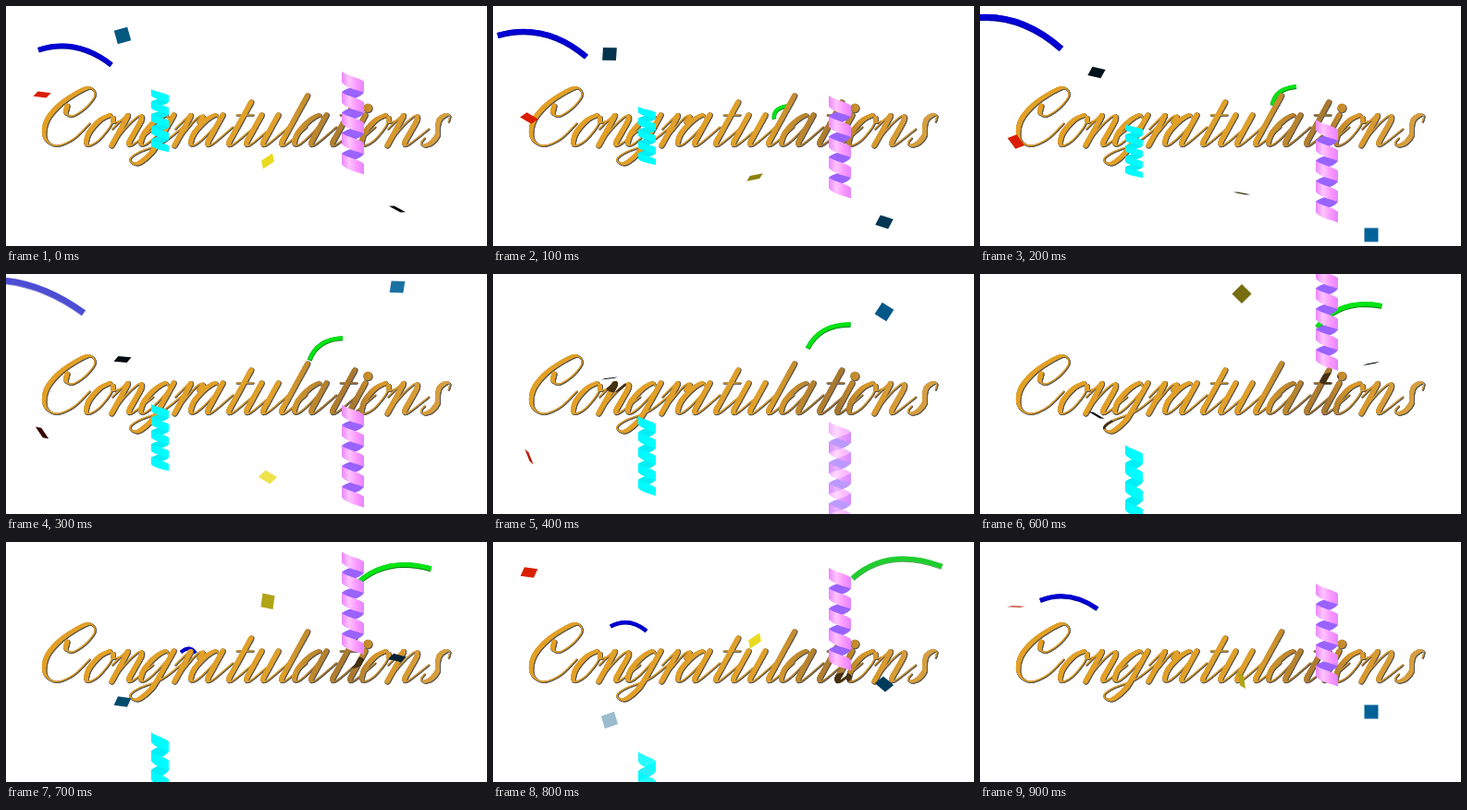
Write an HTML page with a canvas that moves like this. It is 520 by 260 pixels and loops after 1 s.

```html
<!DOCTYPE html>
<html lang="en">
<head>
<meta charset="utf-8">
<title>Congratulations</title>
<style>
html, body { margin: 0; width: 100%; height: 100%; overflow: hidden; background: #fff; }
canvas { display: block; }
</style>
</head>
<body>
<canvas id="stage" width="520" height="260" role="img" aria-label="Congratulations"></canvas>
<script>
const W = 520, H = 260, STEP = 100, STEPS = 10, RAD = Math.PI / 180;
const ctx = document.getElementById('stage').getContext('2d');

// ---------- lettering: pen strokes in upright units, slanted when drawn ----------
const SLANT = 0.55, BASE = 151;
const capC = [3.3,43, 6.7,35, 15.4,32, 24.5,41, 27.3,54, 19,62, 10,60, -4.3,46, -10,29, -5,13, 5.4,3, 18,0, 30.6,8, 38,24];
const oval = [12,33, 4,27, 0,14, 3,3, 8,0, 15,6, 19,20, 17,30, 12,33];
const link = [17,30, 21,25, 29,28];
const bowl = [19,27, 13,33, 5,27, 0,14, 2,3, 7,0.5, 13,8, 20,26];
const tail = [21,33, 20.5,0, 18,-11, 12,-19, 5,-19, 0,-14, 6,-7, 24,2, 34,14, 40,24];
const stem = [-6,18, 0,31, 2,33, 3,28, 3,0];
const arch = [3,2, 8,20, 13,30, 17,32.5, 20,27, 20,12, 20,4, 23,0, 28,4, 38,18];
const arm = [3,3, 7,18, 10,28, 14,32.5, 17,30, 15.5,26];
const ess = [24,26, 22,32, 17,33, 13,28, 16,19, 20,11, 18,3, 12,0, 7,3, 8,8];
const bar = [-5,33, 13,33];
const hook = (x, h) => [x,h, x,12, x,4, x+3,0, x+8,4, x+18,20];

// Each letter: its advance, then its strokes.
const glyphs = {
  C: [43, capC],
  o: [29, oval, link],
  n: [31, stem, arch],
  g: [37, bowl, tail],
  r: [17, stem, arm],
  a: [40, bowl, hook(20, 33)],
  t: [20, hook(3, 47), bar],
  u: [38, hook(2, 33), hook(20, 33)],
  l: [14, hook(2, 54)],
  i: [12, hook(2, 33)],
  s: [30, ess]
};

function spline(p0, p1, p2, p3, t) {
  return 0.5 * (2 * p1 + (p2 - p0) * t + (2 * p0 - 5 * p1 + 4 * p2 - p3) * t * t +
    (3 * p1 - p0 - 3 * p2 + p3) * t * t * t);
}

function trace(pts, ox) {
  const n = pts.length / 2, out = [];
  const point = (i, c) => pts[2 * Math.max(0, Math.min(n - 1, i)) + c];
  for (let i = 0; i < n - 1; i++) {
    for (let s = 0; s <= 12; s++) {
      const [u, v] = [0, 1].map(c =>
        spline(point(i - 1, c), point(i, c), point(i + 1, c), point(i + 2, c), s / 12));
      out.push([ox + u + SLANT * v, BASE - v]);
    }
  }
  return out;
}

// Downstrokes along the slant are thick, all others are hairlines.
function penStroke(g, pts, extra) {
  const len = Math.hypot(SLANT, 1);
  for (let i = 1; i < pts.length; i++) {
    const [x0, y0] = pts[i - 1], [x1, y1] = pts[i];
    const dx = x1 - x0, dy = y1 - y0, d = Math.hypot(dx, dy);
    if (d < 0.01) continue;
    const down = Math.max(0, (dy - SLANT * dx) / (d * len));
    g.lineWidth = 1.8 + 4 * down ** 1.6 + extra;
    g.beginPath();
    g.moveTo(x0, y0);
    g.lineTo(x1, y1);
    g.stroke();
  }
}

function layer() {
  const c = document.createElement('canvas');
  c.width = W;
  c.height = H;
  return c.getContext('2d');
}

function drawWord(g, paint, extra) {
  let x = 39;
  g.strokeStyle = g.fillStyle = paint;
  g.lineCap = 'round';
  for (const ch of 'Congratulations') {
    const [advance, ...strokes] = glyphs[ch];
    for (const pts of strokes) penStroke(g, trace(pts, x), extra);
    x += advance;
  }
  g.beginPath();
  g.arc(391, 110.5, 5 + extra / 2, 0, 7);
  g.fill();
}

const lettering = layer(), lit = layer();
const gold = lettering.createLinearGradient(39, 0, 481, 0);
[[0, '#e4a024'], [0.58, '#e0a02a'], [0.68, '#b8832e'], [0.76, '#a87730'], [0.82, '#d99828'], [1, '#d6a046']]
  .forEach(([pos, c]) => gold.addColorStop(pos, c));
lettering.translate(0.6, 0.6);
drawWord(lettering, '#5c5850', 0.5);
lettering.translate(-0.6, -0.6);
drawWord(lettering, gold, -0.6);

// ---------- helpers for motion ----------
// Straight moves between key poses; the first number of each pose is its step.
function pose(keys, k) {
  let i = 1;
  while (i < keys.length - 1 && k > keys[i][0]) i++;
  const a = keys[i - 1], b = keys[i], f = (k - a[0]) / (b[0] - a[0]);
  return a.map((n, j) => n + (b[j] - n) * f);
}

const wrap = (k, first) => first + ((k - first) % STEPS + STEPS) % STEPS;

// ---------- confetti: squares spinning in space ----------
// Poses: step, height, tilt, axis, light (0 black, 1 full colour, 2 white).
const confetti = [
  { x: 126, rgb: [4, 88, 128], keys: [
    [0, 32, 0, -36, 1], [2, 72, 49, 0, 0.2], [4, 113, 86, -7, 0.1], [6, 153, 82, 28, 0.1], [8, 193, 20, -38, 1.6]] },
  { x: 39, rgb: [218, 30, 0], keys: [
    [-2, 33, 50, -5, 1], [-1, 70, 86, 0, 0.85], [0, 96, 68, 0, 1], [2, 147, 49, 40, 1],
    [3, 172, 73, 50, 0.25], [4, 198, 81, 65, 0.85]] },
  { x: 423, rgb: [0, 98, 152], keys: [
    [3, 14, 35, -15, 1.1], [4, 41, 0, 13, 0.9], [6, 97, 86, -12, 0.1], [8, 154, 41, 25, 0.6],
    [9, 184, 0, 70, 1], [10, 220, 80, 25, 0.1], [12, 248, 0, -20, 1]] },
  { x: 283, rgb: [234, 218, 30], keys: [
    [6, 21.5, 0, 25, 0.5], [8, 107, 57, 135, 1], [9, 150, 70, 75, 0.75], [10, 168, 57, 135, 1],
    [12, 203, 86, 190, 0.2], [13, 220, 48, 197, 1.2]] }
];

function drawConfetti({ x, rgb, keys }, k) {
  const t = wrap(k, keys[0][0]);
  if (t > keys[keys.length - 1][0]) return;
  const [, y, tilt, axis, light] = pose(keys, t);
  const tone = rgb.map(c => light < 1 ? c * light : c + (255 - c) * (light - 1));
  ctx.save();
  ctx.translate(x, y);
  ctx.rotate(axis * RAD);
  ctx.scale(1, Math.max(0.06, Math.cos(tilt * RAD)));
  ctx.rotate(-25 * RAD);
  ctx.beginPath();
  for (let i = 0; i < 4; i++) ctx.lineTo(10.6 * Math.cos(i * Math.PI / 2), 10.6 * Math.sin(i * Math.PI / 2));
  ctx.fillStyle = `rgb(${tone.map(Math.round)})`;
  ctx.fill();
  ctx.restore();
}

// ---------- arcs ----------
function arc([x0, y0, cx, cy, x1, y1], width, color, edge, alpha) {
  ctx.globalAlpha = alpha;
  for (const [d, c, w] of [[0.6, edge, width], [0, color, width - 0.8]]) {
    ctx.strokeStyle = c;
    ctx.lineWidth = w;
    ctx.beginPath();
    ctx.moveTo(x0, y0 + d);
    ctx.quadraticCurveTo(cx, cy + d, x1, y1 + d);
    ctx.stroke();
  }
  ctx.globalAlpha = 1;
}

const blueArc = [
  [8, 127, 91, 147.5, 80.5, 166, 96],
  [9, 65, 63, 96, 50.5, 127, 72],
  [12, -25, 16, 36, 0, 88, 46],
  [13, -40, 8, 24, -2, 84, 42]
];

function drawArcs(k) {
  const b = wrap(k, 7);
  if (b <= 13) arc(pose(blueArc, b).slice(1), 4.4 + (b - 8) * 0.6, '#0000d2', '#0000a0', b === 13 ? 0.45 : 1);

  if (k < 1 || k > 8) return;
  const n = k - 2;
  const x0 = 316 + 12.1 * n, y0 = 107 - 14.5 * n + 0.53 * n * n;
  const x1 = 342 + 21.5 * n + 0.4 * n * n, y1 = 87 - 19.3 * n + 1.53 * n * n;
  arc([x0, y0, (x0 + x1) / 2 - 10, y1 + 2 - 0.65 * n * n, x1, y1],
    4.8 + n * 0.2, '#00e414', '#007a0c', k === 8 ? 0.65 : 1);
}

// ---------- curled streamers: nine half turns, back ones first ----------
function ribbon(cx, r, top, half, front, back, alpha) {
  const h = half * 1.05;
  const turn = (i, dir) => {
    const x0 = cx - dir * r, x1 = cx + dir * r, y = top + i * half;
    ctx.beginPath();
    ctx.moveTo(x0, y);
    ctx.bezierCurveTo(x0 + dir * r * 0.4, y + half * 0.4, x1 - dir * r * 0.4, y + half * 0.6, x1, y + half);
    ctx.lineTo(x1, y + half + h);
    ctx.bezierCurveTo(x1 - dir * r * 0.4, y + half * 0.8 + h, x0 + dir * r * 0.4, y + half * 0.6 + h, x0, y + h);
    ctx.fill();
  };
  ctx.globalAlpha = alpha;
  ctx.fillStyle = back;
  for (let i = 1; i < 9; i += 2) turn(i, -1);
  const shade = ctx.createLinearGradient(cx - r, 0, cx + r, 0);
  front.forEach((c, i) => shade.addColorStop(i / (front.length - 1), c));
  ctx.fillStyle = shade;
  for (let i = 0; i < 9; i += 2) turn(i, 1);
  ctx.globalAlpha = 1;
}

// Poses: step, top, height of a half turn.
const pink = [[5, -24, 11.1], [9, 45, 11.1], [12, 123, 11.1], [14, 160, 11.1]];
const cyan = [[0, 90, 6.8], [2, 128, 5.8], [4, 154, 8.6], [6, 185, 10], [8, 227, 10.5]];

// Dark reflections show only on the lettering.
function drawLettering(spots) {
  lit.globalCompositeOperation = 'copy';
  lit.drawImage(lettering.canvas, 0, 0);
  lit.globalCompositeOperation = 'source-atop';
  lit.fillStyle = '#453010';
  for (const [x, y] of spots) {
    lit.beginPath();
    lit.ellipse(x, y, 11, 6, -0.2, 0, 7);
    lit.fill();
  }
  ctx.drawImage(lit.canvas, 0, 0);
}

function draw(k) {
  const [, pinkTop, pinkHalf] = pose(pink, wrap(k, 5));
  ctx.fillStyle = '#fff';
  ctx.fillRect(0, 0, W, H);
  drawArcs(k);
  drawLettering([[377, pinkTop + 120], [133, 41 + 20.2 * k]]);
  for (const piece of confetti) drawConfetti(piece, k);
  if (k < 9) {
    const [, top, half] = pose(cyan, k);
    ribbon(166.5, 9.5, top, half, ['#00f8fc', '#00ffff'], '#00eef4', k === 8 ? 0.85 : 1);
  }
  ribbon(375, 12, pinkTop, pinkHalf, ['#ea86ff', '#ffc4ff', '#fb98ff', '#e584ff'], '#9a62ff', k === 4 ? 0.65 : 1);
}

function tick(now) {
  draw(Math.floor(now / STEP) % STEPS);
  requestAnimationFrame(tick);
}
draw(0);
requestAnimationFrame(tick);
</script>
</body>
</html>
```
